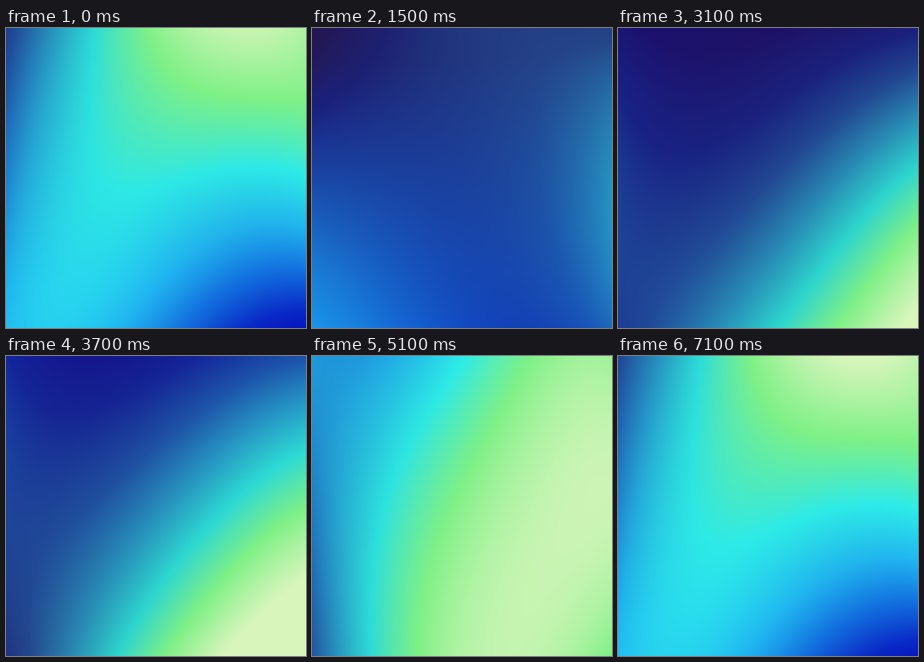
An HTML page with a canvas for the animation above (7.2 s loop, 300 by 300 pixels).

```html
<!DOCTYPE html>
<html lang="en">
<head>
<meta charset="utf-8">
<title>Drifting gradient</title>
<style>
  html, body { margin: 0; width: 100%; height: 100%; overflow: hidden; background: #2cd; }
  canvas { display: block; width: 100vw; height: 100vh; }
</style>
</head>
<body>
<canvas id="stage" width="300" height="300"></canvas>
<script>
const SIZE = 300, LOOP = 7200, STEP = 100;

// Two colour ramps from dark to pale that meet in green
const PALE = [[126, 240, 134], [216, 245, 188]];
const MUTED = [[36, 22, 82], [29, 32, 112], [36, 68, 136], [41, 136, 176], [45, 212, 205], ...PALE];
const VIVID = [[4, 4, 186], [9, 42, 198], [18, 110, 222], [32, 182, 240], [45, 238, 236], ...PALE];

const clamp = (v, lo, hi) => Math.min(hi, Math.max(lo, v));

// A value that swings once per loop and is highest at `peak`, a fraction of the loop
const pulse = (mid, swing, peak) => t => mid + swing * Math.cos(2 * Math.PI * (t - peak));

// Lagrange weights: how much each node counts at position p
const influence = (nodes, p) => nodes.map(a =>
  nodes.reduce((w, b) => a === b ? w : w * (p - b) / (a - b), 1));

const blend = (weights, values) => weights.reduce((sum, w, i) => sum + w * values[i], 0);

// A smooth surface through a mesh of pulses
function field(xs, ys, rows) {
  const axis = nodes => Array.from({ length: SIZE }, (_, p) => influence(nodes, p + 0.5));
  const wx = axis(xs), wy = axis(ys);
  return t => {
    const now = rows.map(row => row.map(node => node(t)));
    return y => {
      const line = xs.map((_, c) => blend(wy[y], now.map(row => row[c])));
      return x => blend(wx[x], line);
    };
  };
}

// Position on the ramps, 0..6
const level = field([0, 60, 170, 300], [0, 150, 300], [
  [pulse(1.3, 1.7, 0.79), pulse(1.8, 2.1, 0.88), pulse(3.0, 3.1, 0.89), pulse(3.6, 3.0, 0.86)],
  [pulse(2.1, 0.65, 0.85), pulse(2.7, 1.7, 0.85), pulse(3.5, 2.1, 0.79), pulse(4.4, 1.45, 0.70)],
  [pulse(2.3, 0.8, 0), pulse(3.1, 1.1, 0.80), pulse(3.6, 2.3, 0.64), pulse(3.6, 3.2, 0.53)]
]);

// Mix from the muted ramp, 0, to the vivid one, 1
const tint = field([0, SIZE], [0, SIZE], [
  [pulse(0.3, 0.45, 0.69), pulse(0.5, 0.6, 0.78)],
  [pulse(0.6, 0.6, 0.08), pulse(0.5, 0.65, 0.97)]
]);

const ctx = document.getElementById("stage").getContext("2d");
const image = ctx.createImageData(SIZE, SIZE);

function draw(t) {
  const levelNow = level(t), tintNow = tint(t), px = image.data;
  let o = 0;
  for (let y = 0; y < SIZE; y++) {
    const levelAt = levelNow(y), tintAt = tintNow(y);
    for (let x = 0; x < SIZE; x++) {
      const l = clamp(levelAt(x), 0, 6), v = clamp(tintAt(x), 0, 1);
      const i = Math.min(5, Math.floor(l)), f = l - i;
      for (let k = 0; k < 3; k++) {
        const muted = MUTED[i][k] + (MUTED[i + 1][k] - MUTED[i][k]) * f;
        const vivid = VIVID[i][k] + (VIVID[i + 1][k] - VIVID[i][k]) * f;
        px[o++] = muted + (vivid - muted) * v;
      }
      px[o++] = 255;
    }
  }
  ctx.putImageData(image, 0, 0);
}

const start = performance.now();
let shown = -1;
function tick() {
  const t = Math.floor((performance.now() - start) % LOOP / STEP) * STEP;
  if (t !== shown) draw((shown = t) / LOOP);
  requestAnimationFrame(tick);
}
tick();
</script>
</body>
</html>
```
